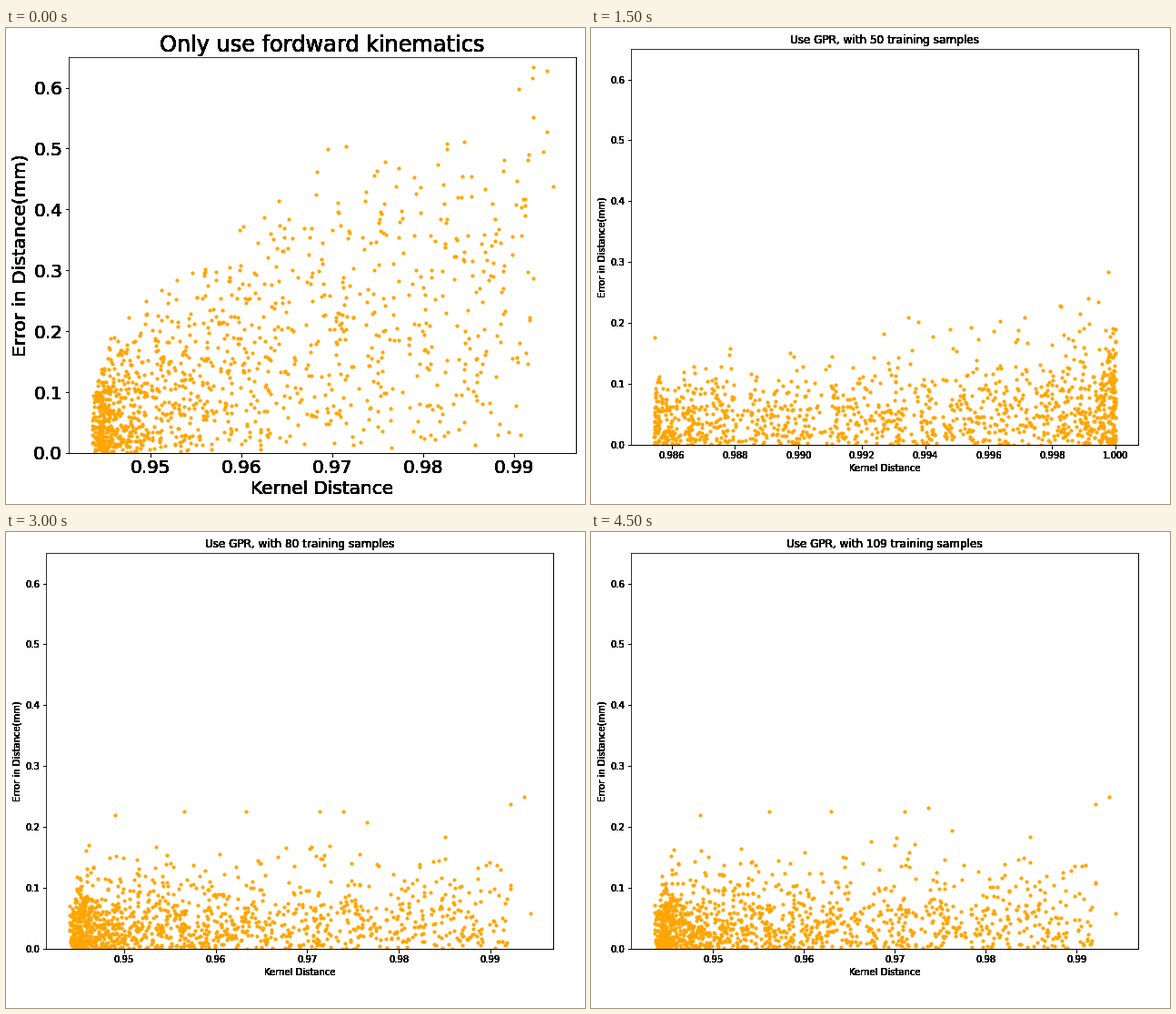
Write a matplotlib script that moves like this. It is 637 px wide and 523 px high and loops after 5000 ms.

```python
import numpy as np
import matplotlib.pyplot as plt
from matplotlib.animation import FuncAnimation

W, H, DPI = 637, 523, 72
AX_W, AX_H = 558, 434.88
COUNT = 1200
LAYERS = 12  # stacked copies of the axes give the heavy, hard-edged text

# (training samples, left x limit, right x limit)
STEPS = [
    (0, .9410, .9968),
    (30, .98425, 1.000287),
    (40, .98059, 1.0007),
    (50, .98472, 1.000717),
    (60, .983756, 1.00076),
    (70, .9397, .9966),
    (80, .941464, .99685),
    (90, .9412, .9968),
    (100, .9398, .99673),
    (109, .9410, .9968),
]

# A few standout points: (fraction of the axis width, error)
RAW_PEAKS = [(.916, .634), (.943, .628), (.914, .616), (.943, .528),
             (.935, .495), (.547, .503), (.511, .499), (.955, .438)]
FIT_PEAKS = [(.136, .220), (.273, .225), (.394, .225), (.540, .225),
             (.915, .238), (.943, .250), (.955, .058)]


def samples(n):
    """Axis fraction and error of every point for one step."""
    rng = np.random.default_rng(7)
    r = rng.random(COUNT)
    two_ended = 30 <= n <= 60
    if two_ended:
        u = np.sin(np.pi * r / 2) ** 1.6
    else:
        u = .94 * r ** 2.1 + .03 * rng.random(COUNT)

    if n == 0:
        err = (.08 + .57 * np.sqrt(u)) * rng.beta(1 + u, 2 + .5 * u)
    else:
        sigma = .05 + .035 * u if two_ended else .045 + .027 * u ** .4
        drift = np.random.default_rng(n).normal(0, .08, COUNT)
        err = np.abs(sigma * (rng.normal(size=COUNT) + drift))

    x = .0455 + .909 * u
    if not two_ended:
        px, py = np.transpose(FIT_PEAKS if n else RAW_PEAKS)
        x, err = np.r_[x, px], np.r_[err, py]
    return x, err


def style(ax, n, lo, hi):
    size = 10 if n else 20
    title = f"Use GPR, with {n} training samples" if n else "Only use fordward kinematics"
    ax.set_title(title, fontsize=1.2 * size)
    ax.set_xlabel("Kernel Distance", fontsize=size)
    ax.set_ylabel("Error in Distance(mm)", fontsize=size)
    ax.tick_params(labelsize=size)
    ax.set_xlim(lo, hi)
    ax.set_ylim(0, .65)
    ax.ticklabel_format(useOffset=False)


def update(step):
    n, lo, hi = STEPS[step]
    left, bottom = (44, 65) if n else (69, 56)
    box = [left / W, bottom / H, AX_W / W, AX_H / H]
    fig.clear()
    for layer in range(LAYERS):
        ax = fig.add_axes(box, label=f"layer{layer}")
        style(ax, n, lo, hi)
        if layer:
            ax.patch.set_visible(False)
            ax.spines[["left", "top"]].set_visible(False)
        else:
            x, y = samples(n)
            ax.scatter(lo + x * (hi - lo), y, s=10, color="orange")
    return []


plt.rcParams["font.family"] = "DejaVu Sans"
fig = plt.figure(figsize=(W / DPI, H / DPI), dpi=DPI, facecolor="white")
anim = FuncAnimation(fig, update, frames=len(STEPS), interval=500,
                     init_func=lambda: [], repeat=True, repeat_delay=0)
plt.show()
```
